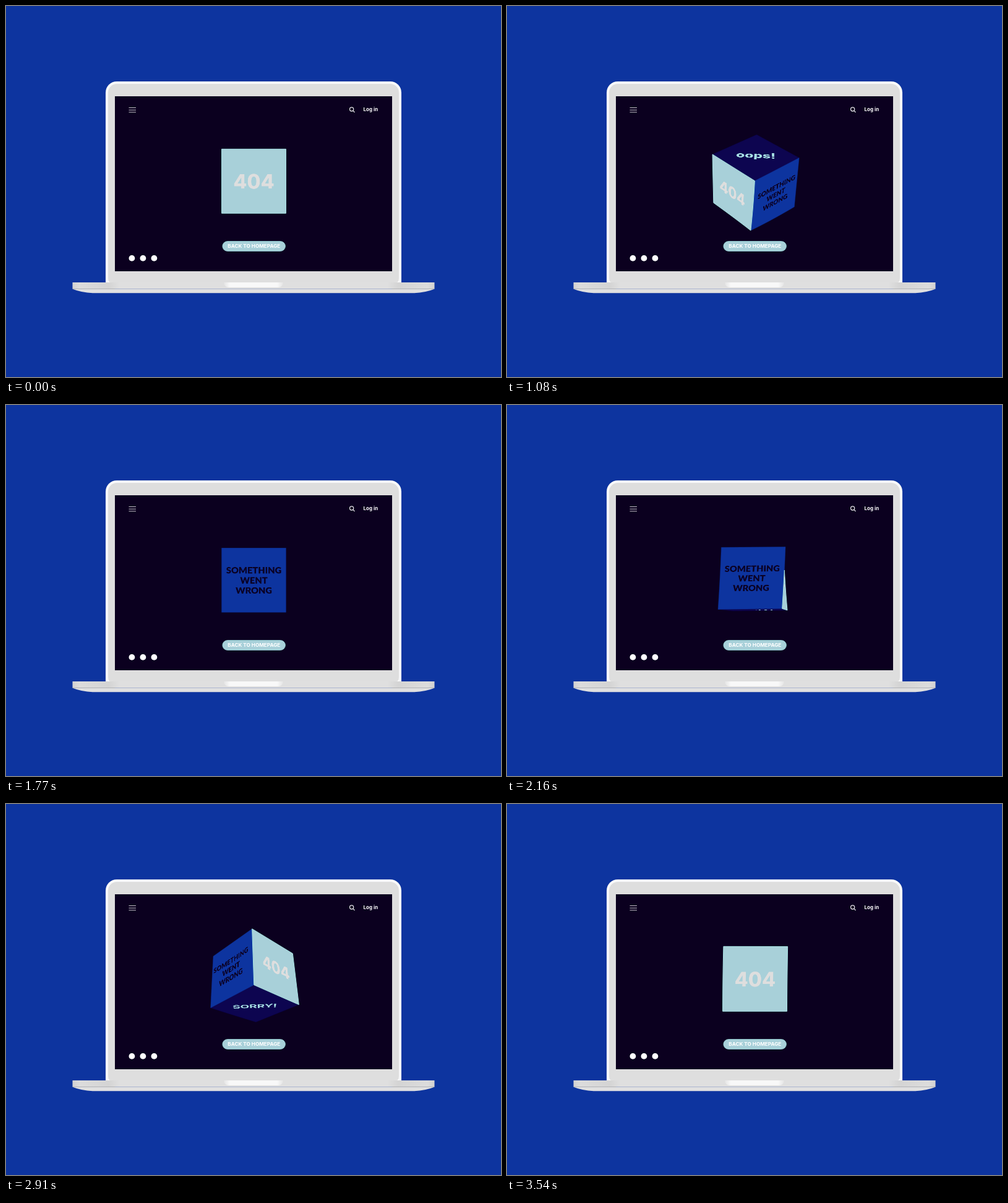
Write an HTML page with a canvas that moves like this. It is 800 px wide and 600 px high and loops after 3570 ms.

```html
<!DOCTYPE html>
<html lang="en">
<head>
<meta charset="utf-8">
<title>404</title>
<style>
  html, body { margin: 0; width: 100%; height: 100%; overflow: hidden; background: #0d349f; }
  svg, canvas { position: absolute; left: 0; top: 0; width: 800px; height: 600px; }
  text { font: 700 8px Inter, sans-serif; fill: #fff; }
</style>
</head>
<body>
<svg viewBox="0 0 800 600">
  <defs>
    <linearGradient id="bar">
      <stop offset="0" stop-color="#d2d2d2"/>
      <stop offset=".02" stop-color="#dcdcdc"/>
      <stop offset=".1" stop-color="#d4d4d4"/>
      <stop offset=".13" stop-color="#dfdfdf"/>
      <stop offset=".87" stop-color="#dfdfdf"/>
      <stop offset=".9" stop-color="#d4d4d4"/>
      <stop offset=".98" stop-color="#dcdcdc"/>
      <stop offset="1" stop-color="#d2d2d2"/>
    </linearGradient>
    <linearGradient id="notch">
      <stop offset="0" stop-color="#e4e4e4"/>
      <stop offset=".1" stop-color="#f8f8f8"/>
      <stop offset=".9" stop-color="#f8f8f8"/>
      <stop offset="1" stop-color="#e4e4e4"/>
    </linearGradient>
  </defs>

  <path d="M161 447V140a18 18 0 0 1 18-18H621a18 18 0 0 1 18 18V447z" fill="#fafafa"/>
  <path d="M165 440V140a14 14 0 0 1 14-14H621a14 14 0 0 1 14 14V440q0 7-4 7H169q-4 0-4-7z" fill="#dedede"/>
  <path d="M176 146H624V429H176z" fill="#0b001f"/>

  <path d="M107 457.500H693Q678 463.500 660 464.200H140Q122 463.500 107 457.500z" fill="#e0e0e0"/>
  <path d="M107.500 447H692.500V457.500H107.500z" fill="url(#bar)"/>
  <path d="M108 457.500H176M624 457.500H692" stroke="#b4b4b4" stroke-width=".8"/>
  <path d="M352 447H448Q447 455 440 455H360Q353 455 352 447z" fill="url(#notch)"/>

  <path d="M198.500 164.500h11.500M198.500 168.200h11.500M198.500 171.800h11.500" stroke="#c4c1c8" stroke-width="1.100"/>
  <g fill="none" stroke="#e4e2e6" stroke-width="1.200">
    <circle cx="558.600" cy="167" r="3.100"/>
    <path d="M560.800 169.300l2.700 2.700"/>
  </g>
  <text x="577.600" y="170.400">Log in</text>

  <g fill="#fff">
    <circle cx="203.400" cy="407.900" r="4.900"/>
    <circle cx="221.400" cy="407.900" r="4.900"/>
    <circle cx="239.400" cy="407.900" r="4.900"/>
  </g>

  <rect x="350" y="380.700" width="101.300" height="15.600" rx="7.800" fill="#a8d0d9" stroke="#a2e2e2"/>
  <text x="400.800" y="391.300" text-anchor="middle" style="font-size:8.200px">BACK TO HOMEPAGE</text>
</svg>
<canvas id="stage" width="800" height="600"></canvas>

<script>
const LOOP = 3570, STEP = 30;
const SIZE = 95.6, H = SIZE / 2, R = H * Math.SQRT2;
const CX = 400.5, CY = 283.3;
const TOP = 192, BOTTOM = 372;
const REST_ROW = 336, LAG = 1.05; // rows above REST_ROW run late, in ms per pixel
const rad = deg => deg * Math.PI / 180;

// start, end, tilt before, tilt after; every leg turns the cube by 45 degrees
const legs = [
  [0, 860, 0, 35],
  [1000, 1660, 35, 0],
  [1915, 2775, 0, -30],
  [2860, 3555, -30, 0]
];

const ctx = document.getElementById('stage').getContext('2d');

function label(lines, font, leading, color) {
  const c = document.createElement('canvas');
  c.width = c.height = 192;
  const g = c.getContext('2d');
  g.setTransform(2, 0, 0, 2, 96, 96);
  g.font = font;
  g.fillStyle = color;
  g.textAlign = 'center';
  const m = g.measureText(lines[0]);
  const shift = (m.actualBoundingBoxAscent - m.actualBoundingBoxDescent) / 2;
  lines.forEach((s, i) => g.fillText(s, 0, (i - (lines.length - 1) / 2) * leading + shift));
  return c;
}

const square = [[-H, -H], [H, -H], [H, H], [-H, H]];
const diamond = [[0, -R], [R, 0], [0, R], [-R, 0]];
const side = (u, v) => [u, -v, H];

const code = {
  fill: '#a8d0d9', edge: '#a6e2e2', quad: square, at: side,
  tex: label(['404'], '800 29.5px Inter, sans-serif', 0, '#dedede')
};
const message = {
  fill: '#0d349f', edge: '#0d349f', quad: square, at: side,
  tex: label(['SOMETHING', 'WENT', 'WRONG'], '900 13.5px Lato, sans-serif', 14.8, '#0a0024')
};
const lid = {
  fill: '#0d0550', edge: '#0d0550', quad: diamond, turn: 45, at: (u, v) => [u, H, v],
  tex: label(['oops!'], '800 22px Inter, sans-serif', 0, '#a6dfe4')
};
const base = {
  fill: '#0d0550', edge: '#0d0550', quad: diamond, turn: 135, at: (u, v) => [u, -H, -v],
  tex: label(['SORRY!'], '700 18px Inter, sans-serif', 0, '#a6dfe4')
};
const faces = [
  lid, base,
  { ...message, turn: 90 }, { ...message, turn: 270 },
  { ...code, turn: 0 }, { ...code, turn: 180 }
];

// cubic-bezier(.4, 0, .4, 1)
function ease(x) {
  if (x <= 0) return 0;
  if (x >= 1) return 1;
  let lo = 0, hi = 1;
  for (let i = 0; i < 16; i++) {
    const s = (lo + hi) / 2;
    if (1.2 * s * (1 - s) + s * s * s < x) lo = s; else hi = s;
  }
  return lo * lo * (3 - 2 * lo);
}

function pose(t) {
  let spin = 0, tilt = 0;
  for (const [a, b, from, to] of legs) {
    const p = ease((t - a) / (b - a));
    spin += 45 * p;
    tilt += (to - from) * p;
  }
  return { spin, tilt, depth: 600 + 5 * tilt };
}

function projector(face, { spin, tilt, depth }) {
  const a = rad(spin - face.turn), b = rad(tilt), r = rad(tilt * 0.065);
  const ca = Math.cos(a), sa = Math.sin(a);
  const cb = Math.cos(b), sb = Math.sin(b);
  const cr = Math.cos(r), sr = Math.sin(r);
  return (u, v) => {
    const [x, y, z] = face.at(u, v);
    const x1 = x * ca - z * sa, z1 = x * sa + z * ca;
    const k = depth / (depth - y * sb - z1 * cb);
    const px = x1 * k, py = (z1 * sb - y * cb) * k;
    return [CX + px * cr - py * sr, CY + px * sr + py * cr];
  };
}

function area(p) {
  return p.reduce((sum, [x, y], i) => {
    const [nx, ny] = p[(i + 1) % p.length];
    return sum + x * ny - nx * y;
  }, 0) / 2;
}

// Places the label with the affine map that fits the face along one row
function drawLabel(face, map, row) {
  let v = 0;
  for (let i = 0; i < 3; i++) {
    const slope = (map(0, v + 1)[1] - map(0, v - 1)[1]) / 2;
    if (Math.abs(slope) < 0.02) return;
    v += (row - map(0, v)[1]) / slope;
    v = Math.max(-R, Math.min(R, v));
  }
  const o = map(0, v);
  const l = map(-24, v), r = map(24, v), t = map(0, v - 6), b = map(0, v + 6);
  const ux = (r[0] - l[0]) / 48, uy = (r[1] - l[1]) / 48;
  const vx = (b[0] - t[0]) / 12, vy = (b[1] - t[1]) / 12;
  ctx.setTransform(ux, uy, vx, vy, o[0] - vx * v, o[1] - vy * v);
  ctx.drawImage(face.tex, -48, -48, 96, 96);
  ctx.setTransform(1, 0, 0, 1, 0, 0);
}

function drawRow(y, t) {
  const now = pose(Math.max(0, t + (y - REST_ROW) * LAG));
  ctx.save();
  ctx.beginPath();
  ctx.rect(320, y, 160, 1);
  ctx.clip();
  for (const face of faces) {
    const map = projector(face, now);
    const pts = face.quad.map(([u, v]) => map(u, v));
    if (area(pts) <= 1) continue;
    const ys = pts.map(p => p[1]);
    if (Math.min(...ys) > y + 2 || Math.max(...ys) < y - 1) continue;
    ctx.beginPath();
    pts.forEach(([px, py]) => ctx.lineTo(px, py));
    ctx.closePath();
    ctx.fillStyle = face.fill;
    ctx.fill();
    ctx.strokeStyle = face.edge;
    ctx.lineWidth = face.fill === face.edge ? 0.4 : 1;
    ctx.lineJoin = 'round';
    ctx.stroke();
    drawLabel(face, map, y + 0.5);
  }
  ctx.restore();
}

function frame(now) {
  const t = Math.floor((now % LOOP) / STEP) * STEP;
  ctx.clearRect(320, TOP, 160, BOTTOM - TOP);
  for (let y = TOP; y < BOTTOM; y++) drawRow(y, t);
  requestAnimationFrame(frame);
}
requestAnimationFrame(frame);
</script>
</body>
</html>
```
